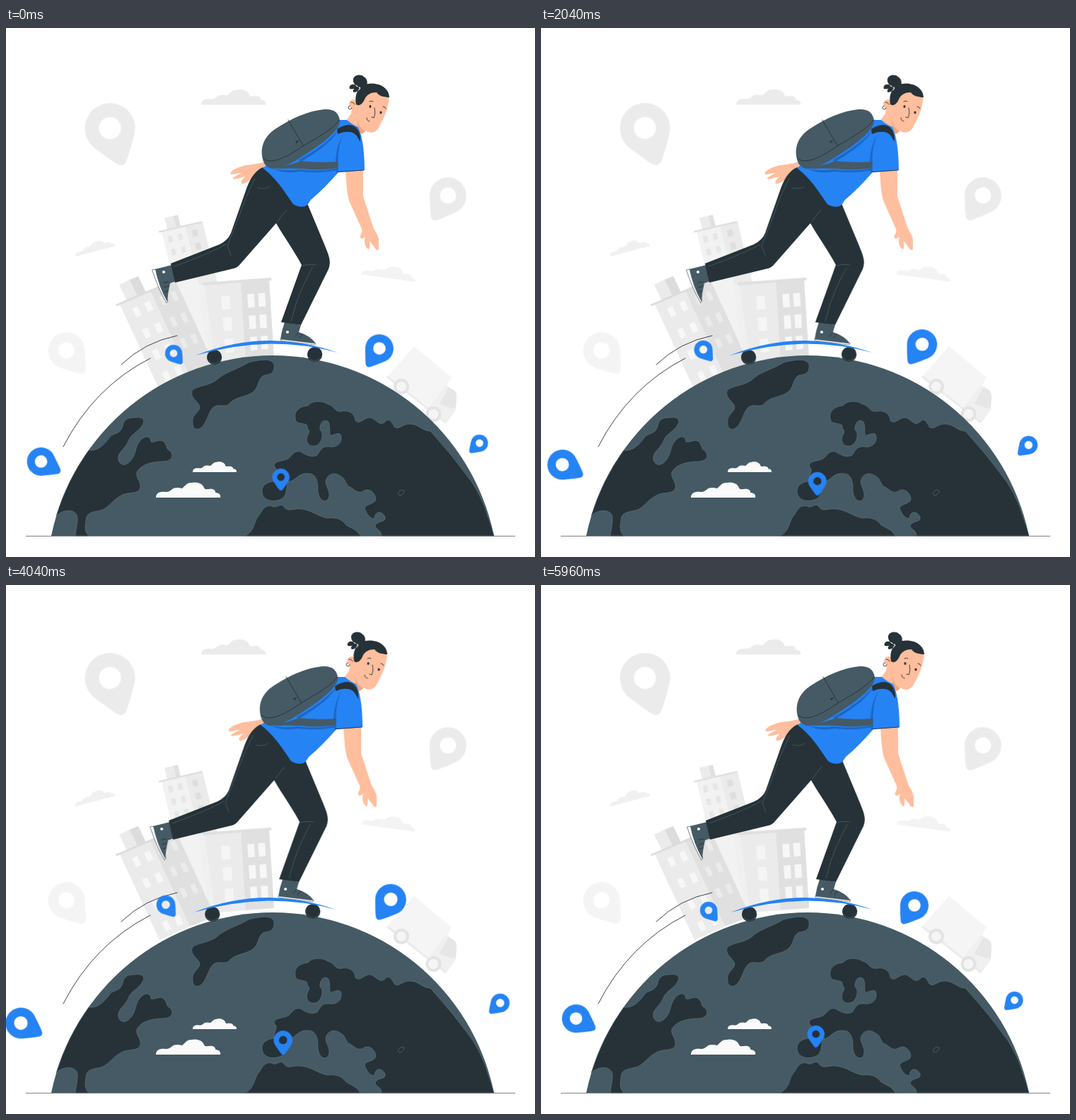
These frames come from a looping animation (748x748 px, 6000 ms). An HTML page:

```html
<!DOCTYPE html>
<html lang="en">
<head>
<meta charset="utf-8">
<title>Skating over the globe</title>
<style>
html, body { margin: 0; width: 100%; height: 100%; overflow: hidden; background: #fff; }
svg { display: block; width: 100vw; height: 100vh; }
#pins { transform-origin: 355.5px 544px; }
.blue { fill: #2583f4; }
.dark { fill: #263238; }
.slate { fill: #455a64; }
.skin { fill: #ffbe9d; }
.line { fill: none; stroke: #263238; stroke-width: .9; stroke-linecap: round; stroke-linejoin: round; }
.seam { fill: none; stroke: #455a64; stroke-width: .9; stroke-linecap: round; }
.land path { stroke: #65767e; stroke-width: .6; }
</style>
</head>
<body>
<svg viewBox="0 0 748 748">
  <defs>
    <path id="pin" fill-rule="evenodd" d="M-8.2 5.8A10 10 0 1 1 8.2 5.8C6 9 4 12 1.8 14.7Q0 16.4-1.8 14.7C-4 12-6 9-8.2 5.8ZM0-4.4A4.4 4.4 0 1 0 0 4.4A4.4 4.4 0 1 0 0-4.4Z"/>
    <path id="cloud" d="M0 22C0 15 6 13 14 14C18 14 19 13 22 11C26 7 32 8 37 9C41 6 43 1 50 1C58-1 66 2 68 8C69 11 72 10 75 10C81 9 85 12 84 15C89 15 92 18 91 22Z"/>
  </defs>

  <g id="backdrop">
    <g id="greyPins"></g>
    <use href="#cloud" transform="translate(276 86.500)" fill="#ebebeb"/>
    <use href="#cloud" transform="translate(94.5 310) rotate(-15) scale(.64 .62)" fill="#f0f0f0"/>
    <use href="#cloud" transform="translate(505 331) rotate(8) scale(.84 .8)" fill="#f3f3f3"/>
    <g id="town"></g>
    <g id="truck">
      <path fill="#f5f5f5" d="M577 450L630 494L604 541L539 493Z"/>
      <path fill="#f0f0f0" d="M622 505L634 512Q638 516 637 522L636 540L623 558L597 538Z"/>
      <path fill="#e6e6e6" d="M626 508L634 513Q637 516 637 522L636 537L629 538L613 531Z"/>
      <path fill="none" stroke="#ebebeb" stroke-width="3" d="M539 493L622 558"/>
      <g fill="#f5f5f5" stroke="#e3e3e3" stroke-width="4">
        <circle cx="559" cy="507" r="9"/><circle cx="604.5" cy="546" r="9"/>
      </g>
    </g>
  </g>

  <path class="slate" d="M64 718A319.6 319.6 0 0 1 690 718Z"/>
  <g class="land dark">
    <path d="M379 476C380 488 374 490 365 491C356 495 358 507 350 514C341 522 325 521 317 530C311 538 303 531 295 535C287 540 286 552 279 562C273 570 264 569 264 559C262 546 273 545 274 536C273 528 260 524 263 513C269 505 290 507 302 494C315 485 330 481 343 473C358 469 376 466 379 476Z"/>
    <path d="M117 597C132 599 141 586 148 577C153 573 162 574 165 563C167 552 174 551 182 551C194 549 197 555 193 561C188 571 177 573 173 584C167 598 157 599 159 611C162 620 171 619 177 611C184 603 183 592 188 586C195 576 204 575 205 585C211 587 217 580 223 585C229 591 225 595 232 598C239 607 232 613 221 613C205 613 190 618 185 628C183 637 191 640 190 650C188 660 173 655 163 661C151 667 147 676 137 681C125 685 113 683 113 697C111 708 112 713 117 718L98 718C99 707 103 697 100 688C94 679 78 682 71 690A319.6 319.6 0 0 1 117 597Z"/>
    <path d="M409 552C407 540 417 535 427 534C433 526 448 527 455 532C464 534 465 544 475 542C485 540 493 545 494 555C500 562 507 550 515 551C524 553 528 565 537 556C542 551 546 558 549 564C556 569 560 560 570 560C583 559 588 570 600 570Q632 605 660 644Q675 668 681 690A319.6 319.6 0 0 1 690 718L531 718C530 708 524 711 522 704C524 696 538 700 536 691C530 681 521 684 521 694C513 693 510 686 507 679C509 672 523 674 523 665C521 655 512 650 505 655C497 660 491 650 484 648C478 640 480 637 472 633C462 626 452 633 452 643C454 651 461 660 454 668C445 672 440 659 441 650C441 638 436 629 427 630C413 628 408 643 399 641C396 647 398 656 393 663C388 669 370 672 364 662C358 651 366 642 379 641C378 633 386 625 380 621C376 612 391 613 399 609C405 604 408 597 416 599C425 604 431 608 440 604C445 597 446 591 457 592C466 594 475 588 474 579C474 570 466 574 461 576C455 577 460 566 456 557C449 551 443 560 444 568C451 574 445 591 436 591C426 592 423 583 427 575C432 568 425 569 426 562C421 557 410 562 409 552Z"/>
    <path d="M338 718C353 711 350 697 358 689C363 681 366 674 376 676C383 681 387 670 393 677C398 685 405 679 416 680C431 681 440 690 454 693C465 692 474 693 481 703C492 709 496 710 501 718Z"/>
  </g>
  <path d="M555 660C553 655 560 652 563 654C563 658 558 663 555 660Z" fill="none" stroke="#65767e" stroke-width=".6"/>
  <path d="M28 718.5H720" stroke="#263238" stroke-width=".6"/>
  <use href="#cloud" transform="translate(264 613) scale(.68)" fill="#fafafa"/>
  <use href="#cloud" transform="translate(212 642)" fill="#fafafa"/>
  <path class="line" d="M163 476Q196 444 242 435M81 592Q124 508 204 467"/>

  <g id="skater">
    <g class="dark"><circle cx="294.700" cy="465.500" r="10.600"/><circle cx="436.700" cy="461.500" r="10.600"/></g>
    <path class="seam" d="M287 470A9 9 0 0 0 303 469M429 466A9 9 0 0 0 445 465"/>
    <path class="blue" d="M268 463Q321 442 374 442Q424 443 469 459Q424 446.500 374 446.500Q321 447.500 268 463Z"/>

    <!-- far hand -->
    <path class="skin" d="M369 188C355 193 346 193 339 194C331 196 322 199 318 204C315 210 326 205 333 205L322 211C318 216 328 213 338 210L333 216C330 224 340 219 345 215C353 209 362 206 372 199Z"/>

    <!-- shoes -->
    <path fill="#fff" stroke="#263238" stroke-width=".6" d="M206.500 342L212 341L229 386L227 389Q215 368 206.500 342Z"/>
    <path class="slate" d="M211 341L235 335L240 358L232 361Q229 373 228 387Q216 366 211 341Z"/>
    <path class="line" d="M223 360L230 359M224 367L230 365M225 373L229 372"/>
    <circle cx="223" cy="345" r="2" fill="#fff"/>
    <path fill="#fff" stroke="#455a64" stroke-width=".6" d="M388 440L438 446L437 448L388 442Z"/>
    <path class="slate" d="M394 416L417 420L414 430Q430 435 438 446L388 440Q390 427 394 416Z"/>
    <path class="line" d="M413 431L409 436M419 433L415 438"/>
    <circle cx="398" cy="430" r="2" fill="#fff"/>

    <!-- trousers -->
    <path class="dark" d="M363 197C350 203 344 216 339 230L318 290Q314 300 302 306L233 333L239 360L322 340Q327 339 331 334L382 276C394 297 407 314 418 335L389 416L417 420L456 341C461 329 455 319 451 308L426 248L400 215Z"/>
    <path class="seam" d="M352 213Q338 240 330 265L313 308L318 321M311 306Q290 318 238 337M356 226Q366 229 373 224M397 257Q389 266 384 274M419 336Q428 333 438 335M433 339Q420 362 410 390L403 415"/>

    <!-- near arm, neck and shirt -->
    <path class="skin" d="M480 200C481 218 482 232 485 244L503 284C505 290 499 293 501 297Q504 299 508 295C505 303 509 312 513 313C515 311 514 304 514 301L523 313Q527 316 527 311L527 299C526 291 520 286 518 278L505 238L505 198Z"/>
    <path class="skin" d="M491 101L488 121L481 131Q488 146 503 150L509 145L514 120Z"/>
    <path class="blue" d="M363 198L430 150L472 130L482 130Q490 137 498 140C505 155 507 180 507 201L470 204Q450 227 431 243L427 249C422 255 412 253 406 249C396 235 385 215 363 198Z"/>
    <path fill="#1b66c6" d="M482 144C472 154 468 175 470 204L467 205L466 188Q468 159 482 144ZM413 187C440 173 463 154 470 143Q462 163 417 189ZM378 199Q397 203 415 200Q444 204 470 198L469 201Q444 206 415 203Q394 207 378 199Z"/>
    <path class="line" d="M470 203.500L506 201"/>
    <path class="dark" d="M468 143C477 137 488 134 495 141Q502 148 501 161L498 156C494 146 482 144 469 150Z"/>

    <!-- backpack -->
    <path class="slate" d="M390 196Q407 192 417 188Q440 191 470 189L469 198Q440 202 420 199Q400 198 382 199Z"/>
    <path class="slate" d="M365 191C357 172 364 153 382 142C403 128 428 117 450 115C465 114 471 121 472 131C472 143 455 157 438 169C416 184 394 199 376 199Q368 197 365 191Z"/>
    <path class="line" d="M399 130L420 166M364 184C374 195 398 182 420 167C441 154 463 143 471 130M410 161L414 159"/>
    <circle class="dark" cx="411" cy="161" r="1.500"/>

    <!-- head -->
    <path class="skin" d="M497 103L507 91L525 89L542 96C541 113 535 126 528 139C523 150 512 150 506 143C500 139 497 133 496 125Z"/>
    <path fill="#f2a27e" d="M496 128Q500 143 508 146L503 150Q498 144 496 128Z"/>
    <path class="skin" d="M497 103C489 98 483 104 486 111Q489 118 497 114Z"/>
    <path class="dark" d="M495 108C492 92 500 79 516 78.500C531 78 542 87 542 98C535 98 527 96 524 91C516 91 510 94 507 101C504 108 499 111 495 108ZM500 85C495 83 490 78 491 72C493 66 502 65 506 69C512 72 512 80 508 84ZM497 82C490 77 484 81 486 86Q493 87 499 84ZM497 83C491 86 489 89 492 91Q499 90 502 84Z"/>
    <path class="line" d="M521 113Q523 121 520 127L517 126M510 127Q510 131 514 132M514 104Q517 102 519 104M533 111Q536 111 537 114M488 105Q491 104 493 108"/>
    <path class="line" d="M486 110A2.500 2.500 0 1 0 489 113"/>
    <g class="dark"><ellipse cx="515" cy="111" rx="1.500" ry="2"/><ellipse cx="530" cy="119.500" rx="1.500" ry="2"/></g>
  </g>

  <g id="pins" class="blue"></g>
</svg>
<script>
const el = id => document.getElementById(id);
const LOOP = 6000;

// pins: x, y, radius, tilt
const pin = ([x, y, r, tilt, fill]) =>
  `<use href="#pin" transform="translate(${x} ${y}) rotate(${tilt}) scale(${r / 10})"${fill ? ` fill="${fill}"` : ''}/>`;

el('greyPins').innerHTML = [
  [147, 141.5, 35.5, -19, '#ebebeb'],
  [625, 237, 26, 32, '#ebebeb'],
  [85.5, 456, 26, -38, '#f4f4f4'],
].map(pin).join('');

el('pins').innerHTML = [
  [49.5, 613, 20, -61],
  [237, 460, 12.2, -38],
  [528, 453, 20, 34],
  [669.5, 587, 12.2, 46],
  [388.7, 635, 12.2, 0],
].map(pin).join('');

// A wall is an origin with a width and a height vector; windows sit on a grid of fractions.
const poly = (points, fill) => `<path fill="${fill}" d="M${points.map(p => p.map(n => n.toFixed(1)).join(' ')).join('L')}Z"/>`;

function wall([x, y], [ux, uy], [vx, vy], fill, cols = [], rows = [], w = 0, h = 0, glass = '#f7f7f7') {
  const at = (a, b) => [x + ux * a + vx * b, y + uy * a + vy * b];
  const quad = (a, b, c, d) => [at(a, b), at(c, b), at(c, d), at(a, d)];
  return poly(quad(0, 0, 1, 1), fill) +
    rows.flatMap(b => cols.map(a => poly(quad(a, b, a + w, b + h), glass))).join('');
}

const tower =
  wall([224, 268.5], [18, -4], [5, 20], '#ebebeb') +
  wall([237, 266], [6, -1.5], [5, 20], '#e0e0e0') +
  wall([220, 288], [33, -8], [40, 165], '#f2f2f2', [.2, .62], [.05, .16, .27, .38], .18, .055, '#e6e6e6') +
  wall([253, 280], [25, -6], [40, 165], '#ebebeb', [.3], [.05, .16, .27, .38], .3, .055, '#dedede') +
  wall([216, 287], [61, -14], [.5, 2.5], '#e0e0e0');

const block =
  wall([281, 362], [51, -4], [9, 112], '#ebebeb', [.42], [.17, .44, .71], .24, .17, '#f5f5f5') +
  wall([332, 358], [40, -3], [7, 112], '#e0e0e0', [.2, .58], [.17, .44, .71], .24, .17) +
  wall([272, 363], [9, -1], [15, 112], '#f0f0f0') +
  wall([278, 360], [97, -7], [.4, 4], '#e0e0e0');

const flats =
  wall([160, 363], [17, -8], [12, 25], '#ebebeb') +
  wall([175, 356], [12, -5], [12, 25], '#dcdcdc') +
  wall([161, 391], [43, -19], [56, 121], '#ebebeb', [.28, .68], [.09, .34, .59, .84], .18, .105) +
  wall([204, 372], [36, -14], [56, 121], '#e0e0e0', [.22, .64], [.09, .34, .59], .18, .105, '#ebebeb') +
  wall([155, 391], [82, -35], [1.2, 2.6], '#dcdcdc');

el('town').innerHTML = tower + block + flats;

// Motion tables: [offset, value]
function run(id, steps, toTransform) {
  el(id).animate(
    steps.map(([offset, v]) => ({ offset, transform: toTransform(v) })),
    { duration: LOOP, iterations: Infinity, easing: 'linear' });
}

const UNIT = 748 / 500;
run('skater',
  [0, -1, 2, -4, 4, -4, 4, -4, 2, -1, 0].map((v, i) => [i / 10, v * UNIT]),
  v => `translateX(${v}px)`);
run('backdrop',
  [[0, 0], [1 / 3, 0], [5 / 6, -10 * UNIT], [1, -20 / 3 * UNIT]],
  v => `translateY(${v}px)`);
run('pins',
  [[0, 1], [1 / 6, 1], [1 / 6 + .1, 1.1], [1 / 6 + .3, 1], [1 / 6 + .4, 1], [1 / 6 + .5, 1.1], [1 / 6 + .6, 1], [1, 1]],
  v => `scale(${v})`);
</script>
</body>
</html>
```
